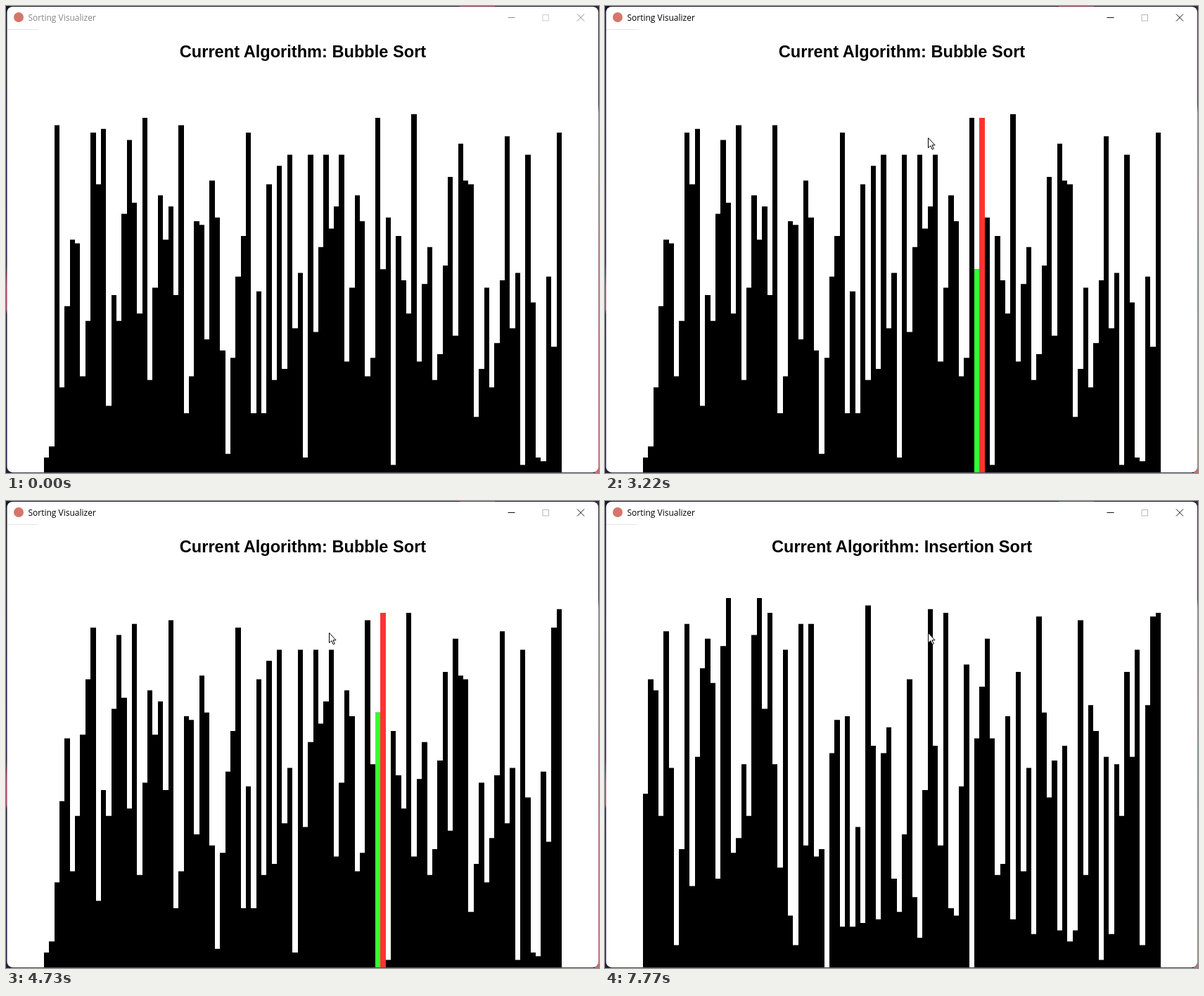
These frames come from a looping animation (843x664 px, 8 s). An HTML page:

```html
<!DOCTYPE html>
<html lang="en">
<head>
<meta charset="utf-8">
<title>Sorting Visualizer</title>
<style>
  html, body { margin: 0; width: 100%; height: 100%; overflow: hidden; background: #16182f; }
  svg { display: block; width: 843px; height: 664px; }
  .title { font: 12px "Open Sans", "Noto Sans", sans-serif; }
  .heading { font: bold 23.6px "Liberation Sans", Arial, sans-serif; text-anchor: middle; }
</style>
</head>
<body>
<svg viewBox="0 0 843 664">
  <defs>
    <linearGradient id="side" x1="0" y1="0" x2="0" y2="1">
      <stop offset="0" stop-color="#16182f"/>
      <stop offset=".55" stop-color="#2a2142"/>
      <stop offset=".6" stop-color="#a04466"/>
      <stop offset=".65" stop-color="#a04466"/>
      <stop offset=".66" stop-color="#1c1c38"/>
      <stop offset="1" stop-color="#20203c"/>
    </linearGradient>
    <linearGradient id="right" x1="0" y1="0" x2="0" y2="1">
      <stop offset="0" stop-color="#3a2440"/>
      <stop offset=".21" stop-color="#3a2440"/>
      <stop offset=".23" stop-color="#8a7f94"/>
      <stop offset="1" stop-color="#c06a78"/>
    </linearGradient>
  </defs>
  <rect width="843" height="664" fill="#16182f"/>
  <rect width="6" height="664" fill="url(#side)"/>
  <rect x="837" width="6" height="664" fill="url(#right)"/>
  <rect x="645" width="50" height="2" fill="#7a2c50"/>
  <rect x="1.5" y="1" width="840.5" height="662.2" rx="8" fill="#fff"/>
  <path d="M2 33.5H46" stroke="#e4e4e4"/>
  <circle cx="18" cy="16" r="7" fill="#d5766a"/>
  <text class="title" id="title" x="31.5" y="21">Sorting Visualizer</text>
  <path id="controls" d="M713.5 16.5h10M812 11.5l10 10m0-10l-10 10" fill="none"/>
  <rect id="maximize" x="763" y="12.5" width="8.5" height="8.5" fill="none"/>
  <text class="heading" id="heading" x="422" y="73"></text>
  <path id="bars"/>
  <path id="low" fill="#33ff33"/>
  <path id="high" fill="#ff3333"/>
  <path id="cursor" d="M.5.5v14.2l3.3-3 2.4 5.2 2.1-1-2.4-5h4.2z" fill="#fff" stroke="#000"/>
</svg>
<script>
const LOOP = 8000, BASE = 663, UNIT = 5.25;
const SWAPS = 224, STOP = 6050, RESET = 7310, RENAME = 7770, FOCUS = 1000;

const firstList = [
  4, 7, 94, 23, 45, 63, 62, 26, 41, 92, 78, 93, 18, 48, 41, 70, 90, 73, 43, 96,
  25, 50, 75, 63, 72, 48, 94, 16, 26, 68, 67, 36, 79, 69, 33, 5, 31, 53, 64, 92,
  16, 49, 16, 78, 25, 83, 28, 86, 39, 54, 4, 86, 38, 61, 86, 66, 72, 86, 30, 50,
  75, 68, 26, 31, 96, 55, 69, 2, 64, 52, 43, 97, 30, 51, 61, 25, 32, 56, 80, 37,
  89, 79, 78, 15, 28, 50, 23, 35, 52, 91, 39, 54, 2, 86, 46, 4, 3, 53, 34, 92];
const secondList = [
  47, 78, 75, 41, 91, 54, 6, 32, 93, 22, 57, 81, 89, 77, 24, 87, 100, 31, 35, 55,
  41, 90, 100, 70, 96, 55, 27, 86, 14, 6, 93, 33, 93, 30, 32, 0, 58, 67, 11, 68,
  11, 38, 12, 98, 60, 13, 58, 65, 24, 15, 36, 78, 19, 8, 48, 97, 60, 33, 96, 16,
  14, 49, 82, 0, 62, 76, 89, 62, 25, 28, 68, 13, 80, 26, 54, 9, 95, 69, 46, 56,
  10, 60, 7, 10, 94, 25, 71, 64, 2, 57, 9, 55, 41, 80, 57, 86, 6, 71, 95, 96];

// Runs of screen updates: start, end, number of updates
const runs = [[2190, 2940, 12], [3010, 3770, 12], [3840, 4600, 12], [4650, 5430, 12], [5490, 6050, 9]];

const el = id => document.getElementById(id);
const set = (id, name, value) => el(id).setAttribute(name, value);
const edge = i => Math.round(53.9 + 7.36 * i);
const bar = (value, i) => `M${edge(i)} ${BASE}V${BASE - UNIT * value}H${edge(i + 1)}V${BASE}z`;

// Bubble sort halted after a given number of swaps
function bubble(list, swaps) {
  const a = list.slice();
  let done = 0;
  for (let end = a.length - 1; end > 0 && done < swaps; end--) {
    for (let j = 0; j < end; j++) {
      if (a[j] <= a[j + 1]) continue;
      [a[j], a[j + 1]] = [a[j + 1], a[j]];
      if (++done === swaps) return { a, j };
    }
  }
  return { a, j: -1 };
}

function swapsAt(t) {
  if (t >= STOP) return SWAPS;
  let tick = -1, base = 0;
  for (const [start, end, n] of runs) {
    if (t >= start) {
      const k = Math.floor((t - start + 7) / ((end - start) / (n - 1)));
      tick = base + Math.min(n - 1, k);
    }
    base += n;
  }
  if (tick < 0) return 0;
  const late = (tick >= 37) + (tick >= 42);
  return Math.min(SWAPS, 4 * tick + 1 + late);
}

function moveCursor(t) {
  const p = Math.min(8, Math.max(0, Math.floor((t - 120) / 68.75 + 0.05))) / 8;
  const rest = (1 - p) ** 2;
  set("cursor", "visibility", t < 120 ? "hidden" : "visible");
  set("cursor", "transform", `translate(${459 + 293 * rest} ${187 + 372 * rest})`);
}

function render(t) {
  const active = t >= FOCUS;
  set("title", "fill", active ? "#000" : "#858585");
  set("controls", "stroke", active ? "#111" : "#8c8c8c");
  set("maximize", "stroke", active ? "#b8b8b8" : "#cecece");
  el("heading").textContent = `Current Algorithm: ${t < RENAME ? "Bubble" : "Insertion"} Sort`;

  const { a, j } = t < RESET ? bubble(firstList, swapsAt(t)) : { a: secondList, j: -1 };
  const lit = j >= 0 && t < STOP;
  set("bars", "d", a.map(bar).join(""));
  set("low", "d", lit ? bar(a[j], j) : "");
  set("high", "d", lit ? bar(a[j + 1], j + 1) : "");
  moveCursor(t);
}

const began = performance.now();
function loop() {
  render((performance.now() - began) % LOOP);
  requestAnimationFrame(loop);
}
render(0);
requestAnimationFrame(loop);
</script>
</body>
</html>
```
